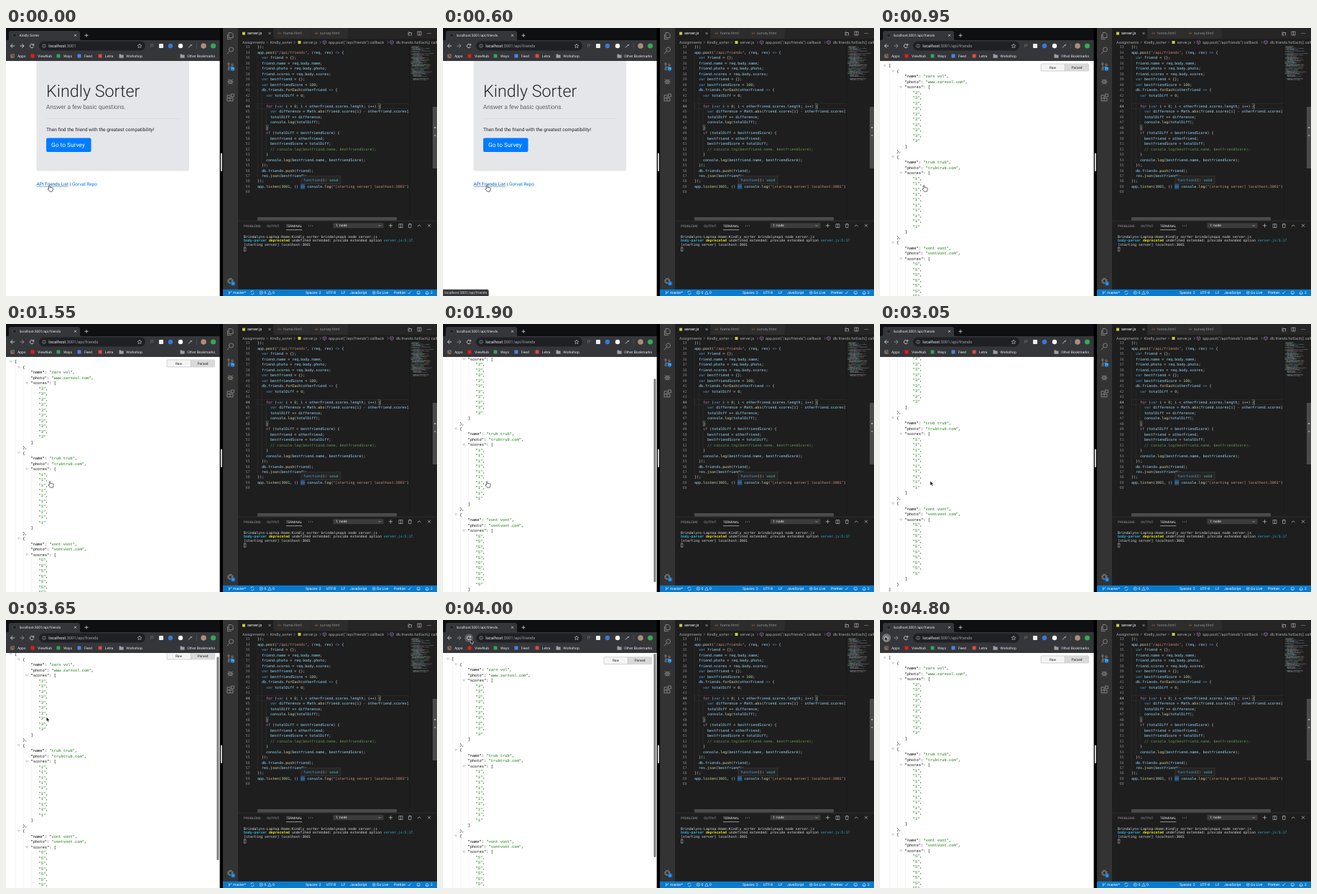
Recreate the animation shown at these times as an HTML page. Size 600 by 374 pixels, loop 4850 ms.

```html
<!DOCTYPE html>
<html lang="en">
<head>
<meta charset="utf-8">
<title>Screen recording</title>
<style>
  html, body { margin: 0; width: 100%; height: 100%; overflow: hidden; background: #000; }
  svg { display: block; width: 100vw; height: 100vh; font-family: Roboto, sans-serif; }
  text { white-space: pre; text-rendering: geometricPrecision; }
  .code { font-family: "DejaVu Sans Mono", monospace; }
  .json { font-family: "Liberation Mono", monospace; }
</style>
</head>
<body>
<svg id="stage" viewBox="0 0 600 374"></svg>
<script>
const LOOP = 4850, LINE = 7.48;
const $ = id => document.getElementById(id);
const esc = s => String(s).replace(/&/g, "&amp;").replace(/</g, "&lt;");

// Drawing helpers; text is placed by its vertical middle.
const rect = (x, y, w, h, fill, more = "") =>
  `<rect x="${x}" y="${y}" width="${w}" height="${h}" fill="${fill}" ${more}/>`;
const dot = (x, y, r, fill, more = "") => `<circle cx="${x}" cy="${y}" r="${r}" fill="${fill}" ${more}/>`;
const ring = (x, y, r, stroke, w = .5, more = "") =>
  dot(x, y, r, "none", `stroke="${stroke}" stroke-width="${w}" ${more}`);
const line = (d, stroke, w = .7, more = "") =>
  `<path d="${d}" fill="none" stroke="${stroke}" stroke-width="${w}" ${more}/>`;
const rich = (x, y, size, fill, inner, more = "") =>
  `<text x="${x}" y="${y + size * .35}" font-size="${size}" fill="${fill}" ${more}>${inner}</text>`;
const text = (x, y, size, fill, s, more) => rich(x, y, size, fill, esc(s), more);
const group = (id, inner) => `<g id="${id}">${inner}</g>`;

// Each capture group of the pattern takes the colour at the same index.
const paint = (s, pattern, colors) => [...s.matchAll(pattern)].map(m => {
  const i = m.slice(1).findIndex(g => g !== undefined);
  return `<tspan fill="${colors[i]}">${esc(m[0])}</tspan>`;
}).join("");

function homePage() {
  const ink = "#212529", blue = "#007bff";
  return rect(42.5, 44, 212.5, 155.5, "#e5e6ea", 'rx="2.5"')
    + text(56, 87.5, 23.3, ink, "Kindly Sorter", 'font-weight="300"')
    + text(56, 110.3, 8.33, ink, "Answer a few basic questions.", 'font-weight="300"')
    + line("M56 126.5H242", "#d4d5d9", .5)
    + text(56, 142, 6.67, ink, "Then find the friend with the greatest compatibility!")
    + rect(56, 153.5, 62.5, 19.5, blue, 'rx="2"')
    + text(63, 163.2, 8.33, "#fff", "Go to Survey")
    + text(42.5, 218, 6.4, "#0056b3", "API Friends List")
    + line("M42.5 221.3H86.5", "#0056b3", .5)
    + text(88.4, 218, 6.4, ink, "|")
    + text(92, 218, 6.4, blue, "Gorvat Repo");
}

function jsonPage() {
  const people = [["zarn vol", "www.zarnvol.com", 3], ["trub trub", "trubtrub.com", 1], ["vont vont", "vontvont.com", 5]];
  const rows = [[0, "["]];
  people.forEach(([name, photo, score], i) => {
    rows.push([1, "{"], [2, `"name": "${name}",`], [2, `"photo": "${photo}",`], [2, '"scores": [']);
    for (let k = 0; k < 10; k++) rows.push([3, `"${score}"${k < 9 ? "," : ""}`]);
    rows.push([2, "]"], [1, i < 2 ? "}," : "}"]);
  });
  rows.push([0, "]"]);
  const xAt = depth => 12 + 11.2 * depth, yAt = i => 52.6 + i * LINE;
  const guide = (depth, from, to) =>
    line(`M${xAt(depth) + 1.2} ${yAt(from) + 4}V${yAt(to) - 4}`, "#c4c4c4", .4, 'stroke-dasharray=".5 .5"');
  let out = guide(0, 0, 49);
  rows.forEach(([depth, s], i) => {
    const x = xAt(depth), y = yAt(i);
    out += rich(x, y, 5.417, "#000", paint(s, /("[^"]*":)|("[^"]*")|(.)/g, ["#000", "#0b7500", "#000"]), 'class="json"');
    if (/[[{]$/.test(s))
      out += line(`M${x - 6.8} ${y - 1}h3l-1.5 2.4z`, "#999", .45) + (depth ? guide(depth, i, i + (depth > 1 ? 11 : 15)) : "");
  });
  return out + rect(224, 50, 66.5, 10, "#f4f4f4", 'rx="1" stroke="#aaa" stroke-width=".5"')
    + rect(257.3, 50.2, 33, 9.6, "#d9d9d9")
    + line("M257.3 50V60", "#aaa", .5)
    + text(240.5, 55, 4.8, "#222", "Raw", 'text-anchor="middle"')
    + text(274, 55, 4.8, "#222", "Parsed", 'text-anchor="middle"');
}

function browserBar() {
  const white = "#e8eaed", gray = "#9aa0a6";
  const folder = x => `<path d="M${x - 3} 36.5h2.3l.8 1h3v4.2h-6.1z" fill="${gray}"/>`;
  const marks = [[44, "ViewNub", "#f01818"], [80, "Ways", "#35a45a"], [109, "Feed", "#4a86e8"], [138, "Letra", "#e04a3f"]];
  let apps = "";
  for (let i = 0; i < 9; i++)
    apps += rect(6.3 + i % 3 * 2, 36.3 + (i / 3 | 0) * 2, 1.4, 1.4, ["#e5554a", "#57a866", "#5c8fe6", "#e8bd4a"][i % 4]);
  return rect(0, 0, 298, 46, "#35363a") + rect(0, 0, 298, 17, "#0f1012")
    + '<path d="M2 17q2 0 2-2V7q0-3 3-3h93q3 0 3 3v8q0 2 2 2z" fill="#35363a"/>'
    + dot(12, 10.3, 2.7, "#1f2023", 'stroke="#5f6368" stroke-width=".5"')
    + text(18.7, 10.4, 4.87, white, "", 'id="title"')
    + line("M95 8.8l3 3m0-3l-3 3", white) + line("M112 7.8v5m-2.5-2.5h5", white)
    + dot(9, 25, 6, "#74767a", 'id="backHover"') + dot(36, 25, 6, "#5a5b60", 'id="reloadHover"')
    + line("M12 25H6.5m2.7-2.8L6.4 25l2.8 2.8", white, .8)
    + line("M19.5 25H25m-2.7-2.8l2.8 2.8l-2.8 2.8", gray, .8, 'id="forward"')
    + line("M38.4 26a2.6 2.6 0 1 1-.6-2.8m.9-1.2v2.1h-2.1", white, .8)
    + rect(46, 18.5, 148, 13, "#1f2023", 'rx="6.5"')
    + ring(53, 25, 2.4, gray, .6) + line("M53 24.6v1.8m0-3v.6", gray)
    + rich(59.3, 25, 5.83, white, `localhost<tspan fill="${gray}">:3001<tspan id="path"></tspan></tspan>`)
    + line("M186 22l.9 2 2.1.2-1.6 1.4.5 2.1-1.9-1.1-1.9 1.1.5-2.1-1.6-1.4 2.1-.2z", white, .5)
    + text(200.5, 25, 6, "#85888c", "f?", 'font-style="italic"') + rect(213, 22, 6, 6, "#eee", 'rx=".8"')
    + dot(229, 25, 3.2, "#3b78d8")
    + dot(243, 25, 3.2, "#fff")
    + line("M254 27.5l3.5-3.5m-.8-1l2 2m-.6-1.3l1-1", "#c5c8cc", .9) + line("M265.3 21v8", "#5f6368", .5)
    + dot(275, 25, 3.8, "#ab8d7c") + dot(288.5, 25, 3.6, "#35a853")
    + apps + text(16, 39, 5, white, "Apps")
    + marks.map(([x, s, c]) => rect(x - 9.5, 36.6, 5, 5, c, 'rx=".8"') + text(x, 39, 5, white, s)).join("")
    + folder(160.5) + text(167.3, 39, 5, white, "Workshop")
    + folder(245.5) + text(252.3, 39, 5, white, "Other Bookmarks");
}

const SOURCE = `});
app.post("/api/friends", (req, res) => {
  var friend = {};
  friend.name = req.body.name;
  friend.photo = req.body.photo;
  friend.scores = req.body.scores;
  var bestfriend = {};
  var bestfriendScore = 100;
  db.friends.forEach(otherFriend => {
    var totalDiff = 0;

    for (var i = 0; i < otherFriend.scores.length; i++) {
      var difference = Math.abs(friend.scores[i] - otherFriend.scores[i]);
      totalDiff += difference;
      console.log(totalDiff);
    }
    if (totalDiff < bestfriendScore) {
      bestfriend = otherFriend;
      bestfriendScore = totalDiff;
      // console.log(bestfriend.name, bestfriendScore);
    }
    console.log(bestfriend.name, bestfriendScore);
  });
  db.friends.push(friend);
  res.json(bestfriend);
});
app.listen(3001, () => console.log("[starting server] localhost:3001"));
`.split("\n");

const SYNTAX = /(\/\/.*)|("[^"]*")|(\b(?:for|if)\b)|(\bvar\b|=>)|(\b\d+)|(\w+(?=\())|(\w+)|(.)/g;
const INKS = ["#6a9955", "#ce9178", "#c586c0", "#569cd6", "#b5cea8", "#dcdcaa", "#9cdcfe", "#d4d4d4"];

function codeArea() {
  const y = n => 34.2 + (n - 34) * LINE;
  const guide = (x, from, to) => line(`M${x} ${y(from) - 3.7}V${y(to) + 3.7}`, "#404040", .4);
  const bracket = (x, n) => rect(x, y(n) - 3.2, 3, 6.4, "#1c2b1c", 'stroke="#888" stroke-width=".4"');
  let out = rect(323, 15, 277, 254, "#1e1e1e")
    + rect(350, y(44) - 3.7, 212, 7.4, "none", 'stroke="#303030" stroke-width=".5"')
    + guide(350.2, 35, 57) + guide(356.2, 42, 54) + guide(362.2, 45, 47) + guide(362.2, 50, 52)
    + bracket(518.6, 44) + bracket(362, 48) + rect(410, y(59) - 3.6, 6.2, 7.2, "#264f78");
  SOURCE.forEach((s, i) => {
    const n = 33 + i;
    out += text(339.5, y(n), 5, n === 44 ? "#c6c6c6" : "#858585", n, 'class="code" text-anchor="end"')
      + rich(350, y(n), 5, "#d4d4d4", paint(s, SYNTAX, INKS), 'class="code"');
  });
  out += rect(411, 206.8, 55, 10.4, "#252526", 'stroke="#454545" stroke-width=".5"')
    + rich(414, 212, 5, "#d4d4d4", paint("function(): void", /(function)|(void)|(.)/g, ["#569cd6", "#4ec9b0", "#d4d4d4"]), 'class="code"')
    + rect(561.5, 24, 38.5, 245, "#1e1e1e") + line("M561.7 24V264", "#141414", .5);

  // Minimap: short coloured strokes from a small seeded generator.
  let seed = 11;
  const random = () => (seed = seed * 16807 % 2147483647) / 2147483647;
  for (let i = 0; i < 59; i++) {
    if (random() < .14) continue;
    let x = 563.5 + Math.floor(random() * 4) * 1.1;
    for (let k = 0, n = 1 + random() * 4; k < n; k++) {
      const w = 2 + random() * 5;
      out += rect(x.toFixed(1), (24.3 + i * .83).toFixed(1), w.toFixed(1), .5, INKS[Math.floor(random() * 8)], 'opacity=".6"');
      x += w + .5;
    }
  }
  return out + rect(594, 110, 6, 86, "#4b4b4b") + rect(596, 138, 2.5, 2, "#a0a0a0") + rect(596, 149, 2.5, 2, "#8a8a8a")
    + rect(350, 264, 194, 4.6, "#4b4b4b");
}

function editorChrome() {
  const gray = "#a9a9a9", icon = "#c5c5c5", dim = "#8a8a8a";
  const cube = x => line(`M${x} 17.3l2.4 1.3v2.7l-2.4 1.3l-2.4-1.3v-2.7zm-2.4 1.3l2.4 1.3l2.4-1.3m-2.4 1.3v2.7`, "#b180d7", .5);
  const jsFile = (x, y) => rect(x - 2, y - 2, 4, 4, "#cbcb41");
  const badge = (x, y, s) => dot(x, y, 3.1, "#1079d6") + text(x, y, 3.4, "#fff", s, 'text-anchor="middle" font-weight="700"');
  const crumbs = [[329, "Assignments"], [367.5, "Kindly_sorter"], [413.5, "server.js"],
    [449, 'app.post("/api/friends") callback'], [543, "db.friends.forEach() callback"]];
  return rect(302, 0, 21, 365, "#333")
    + rect(323, 0, 277, 15, "#252526") + rect(323, 0, 49, 15, "#1e1e1e")
    + rect(372.4, 0, 51.4, 15, "#2d2d2d") + rect(424.2, 0, 51.6, 15, "#2d2d2d")
    + jsFile(331, 7.6) + text(336, 7.5, 5.5, "#fff", "server.js") + line("M365.5 6l3 3m0-3l-3 3", icon, .6)
    + text(378, 7.5, 4.8, "#e37933", "<>") + text(386, 7.5, 5.4, dim, "home.html")
    + text(429.5, 7.5, 4.8, "#e37933", "<>") + text(437, 7.5, 5.4, dim, "survey.html")
    + line("M560 6v4h3m1.5.5v-4h-3m-1-1.5l1.5 1.5l-1.5 1.5", icon) + rect(573, 5, 5, 5, "none", `stroke="${icon}" stroke-width=".6"`)
    + line("M575.5 5v5", icon, .6) + [587, 589, 591].map(x => dot(x, 7.5, .5, icon)).join("")
    + crumbs.map(([x, s]) => text(x, 20, 5.35, gray, s)).join("")
    + [363, 401, 437, 531].map(x => line(`M${x} 18.5l1.5 1.5l-1.5 1.5`, gray, .5)).join("")
    + jsFile(408.5, 20) + cube(443.5) + cube(537)
    // Activity bar
    + line("M310 6.5h4l2 2v5h-6zm-1.6 2.2v7h5.3", dim, .9)
    + ring(313.5, 30, 3, dim, .9) + line("M311.3 32.3l-3.5 4", dim, .9)
    + ring(310, 50, 1.3, dim, .8) + ring(315, 51.5, 1.3, dim, .8) + ring(310, 57.5, 1.2, dim, .8)
    + line("M310 51.4v5m5-3.6q0 2-5 2.4", dim, .8)
    + badge(315.5, 57, "77")
    + ring(312.3, 75, 2.6, dim, .9)
    + line("M312.3 72.4v5.2m-4.5-2.6h9m-8-3.5l2 1.5m5-1.5l-2 1.5m-5 5.5l2-1.5m5 1.5l-2-1.5", dim, .7)
    + line("M308 93.8h4v4h4v4h-8zm0 4h4v4M313.6 92h3.8v3.8h-3.8z", dim, .9)
    + ring(312.3, 353, 3.4, dim, 1.6, 'stroke-dasharray="1.5 1.17"')
    + ring(312.3, 353, 2.4, dim, .8) + badge(316, 356.5, "1");
}

function terminal() {
  const icon = "#c5c5c5", cyan = "#2bb5d8", mono = 'class="code"';
  return rect(323, 269, 277, 96, "#1e1e1e") + line("M323 269.2H600", "#414141", .5)
    + text(331, 276, 4.6, "#969696", "PROBLEMS") + text(363, 276, 4.6, "#969696", "OUTPUT")
    + text(390, 276, 4.6, "#e7e7e7", "TERMINAL") + line("M390 281.7H412.3", "#e7e7e7", .6)
    + [421.5, 424, 426.5].map(x => dot(x, 276, .5, icon)).join("")
    + rect(455.5, 272.2, 70, 7, "#3c3c3c") + text(459, 275.8, 4.8, "#f0f0f0", "1: node")
    + line("M518.5 275l1.6 1.6l1.6-1.6", icon, .6)
    + line("M535.5 273v5.5m-2.75-2.75h5.5", icon) + line("M547 273.5h5v5h-5zm2.5 0v5", icon, .6)
    + line("M559.8 274h5m-3.2 0v-1h1.4v1m-2.6 0l.3 4.5h3.2l.3-4.5", icon, .6)
    + line("M573 277l2.3-2.3l2.3 2.3", icon) + line("M587 273.7l4 4m0-4l-4 4", icon)
    + text(331, 291, 4.84, "#d8d8d8", "Brindalyns-Laptop-Home:Kindly_sorter brindalynqu$ node server.js", mono)
    + rich(331, 296.8, 4.84, "#d8d8d8", `<tspan fill="${cyan}" font-weight="700">body-parser</tspan> `
      + `<tspan fill="#e5e510" font-weight="700">deprecated</tspan> undefined extended: provide extended option `
      + `<tspan fill="${cyan}">server.js:5:17</tspan>`, mono)
    + text(331, 302.6, 4.84, "#d8d8d8", "[starting server] localhost:3001", mono)
    + rect(331.3, 306.2, 2.6, 5.2, "none", 'stroke="#d0d0d0" stroke-width=".5"');
}

function statusBar() {
  const white = "#fff", y = 369.4;
  const labels = [[316, "master*"], [359.5, "0"], [371, "0"], [417, "Spaces: 2"], [446, "UTF-8"], [467, "LF"],
    [479, "JavaScript"], [516, "Go Live"], [540, "Prettier:"], [591, "2"]];
  return rect(302, 364.8, 298, 9.2, "#0a7acc")
    + labels.map(([x, s]) => text(x, y, 5, white, s)).join("")
    + line("M310.5 367.2v4.5m3-4.5q.3 2.2-3 2.6", white, .6)
    + line("M340.7 369a2.2 2.2 0 0 1 4-1m.4 1.8a2.2 2.2 0 0 1-4 1", white, .6)
    + ring(355.3, y, 2.2, white) + line("M354.4 368.5l1.8 1.8m0-1.8l-1.8 1.8", white, .5)
    + line("M367 367.2l2.3 4.2h-4.6z", white, .5)
    + ring(512.3, y, 2, white) + dot(512.3, y, .7, white)
    + line("M560 369.5l1.3 1.5l2.3-3.4", white, .6)
    + ring(574.3, y, 2.2, white) + line("M573 370q1.3 1.3 2.6 0", white, .5)
    + line("M584 371h4.4l-.7-1v-1.3q-1.5-2.8-3 0v1.3zm1.6.9h1.2", white, .6);
}

$("stage").innerHTML = rect(0, 0, 298, 374, "#fff")
  + group("home", homePage()) + group("json", jsonPage())
  + rect(293.4, 0, 3, 284, "#7d7d7d", 'id="thumb" rx="1.5"')
  + browserBar()
  + group("bubble", rect(-2, 365, 65.5, 12, "#35363a", 'rx="2" stroke="#606266" stroke-width=".5"')
    + text(2, 369.7, 5, "#d5d7da", "localhost:3001/api/friends"))
  + rect(297.6, 0, 4.4, 374, "#000") + rect(298.9, 174.5, 2, 25.5, "#d8d8d8", 'rx="1"')
  + codeArea() + editorChrome() + terminal() + statusBar()
  + group("cursor",
    group("hand", '<path d="M-1-.2q1-1 1.7 0v2.4q1-.7 1.5.1q.9-.6 1.4.2q1-.3 1.2.6v2.2l-.9 2.4H.3L-2.2 4.6q-.2-1.3 1.2-.6z" fill="#fff" stroke="#000" stroke-width=".6"/>')
    + group("arrow", '<path d="M0 0v6.2l1.4-1.3l1 2.3l1.1-.5l-1-2.2h2z" fill="#000" stroke="#fff" stroke-width=".5"/>'));

// Smoothly eased value along [time, value] points.
function track(t, points) {
  const next = points.findIndex(p => p[0] > t);
  if (next < 0) return points[points.length - 1][1];
  if (next === 0) return points[0][1];
  const [t0, a] = points[next - 1], [t1, b] = points[next];
  const u = (t - t0) / (t1 - t0);
  return a + (b - a) * u * u * (3 - 2 * u);
}

const SCROLL = [[1650, 0], [2050, 49], [2200, 50.2], [2450, 49], [3250, 49], [3750, 0], [3900, -2.3], [4200, 0]];
const CURSOR_X = [[0, 60.5], [500, 61.3], [2600, 61.3], [3000, 70], [3400, 70], [3950, 38.3], [4150, 38.3], [4650, 7]];
const CURSOR_Y = [[0, 220.5], [2600, 220.5], [3000, 219], [3400, 219], [3950, 26.7], [4150, 26.7], [4650, 23]];
const BAR_ALPHA = [[1650, 0], [1700, 1], [2450, 1], [2650, 0], [3250, 0], [3300, 1], [4150, 1], [4350, 0]];

const show = (id, on) => $(id).setAttribute("visibility", on ? "visible" : "hidden");
const start = performance.now();

function render() {
  const t = (performance.now() - start) % LOOP;
  const visited = t >= 550, loaded = t >= 700;
  const scroll = track(t, SCROLL), x = track(t, CURSOR_X), y = track(t, CURSOR_Y);
  const hovers = center => y < 32 && Math.abs(x - center) < 6;

  $("title").textContent = visited ? "localhost:3001/api/friends" : "Kindly Sorter";
  $("path").textContent = visited ? "/api/friends" : "";
  $("forward").setAttribute("stroke", visited ? "#9aa0a6" : "#e8eaed");
  show("home", !loaded);
  show("json", loaded);
  show("bubble", t >= 100 && !loaded);
  $("json").setAttribute("transform", `translate(0 ${-scroll})`);
  $("thumb").setAttribute("y", 47 + Math.max(0, Math.min(49, scroll)) * .87);
  $("thumb").setAttribute("opacity", track(t, BAR_ALPHA));
  show("backHover", hovers(9));
  show("reloadHover", hovers(36));
  $("cursor").setAttribute("transform", `translate(${x} ${y})`);
  show("hand", t < 2620);
  show("arrow", t >= 2620);
  requestAnimationFrame(render);
}
render();
</script>
</body>
</html>
```
